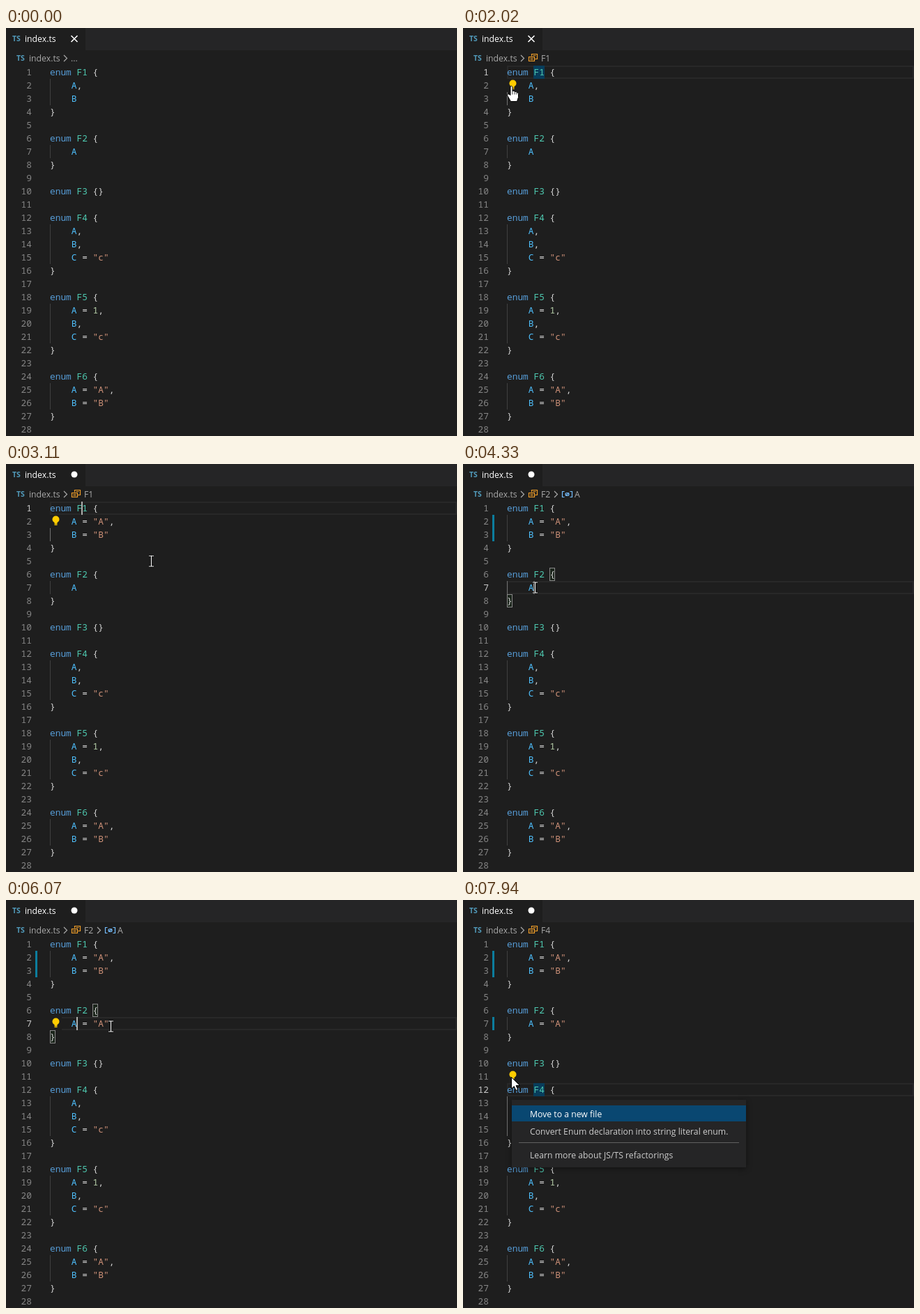
An HTML page with a canvas for the animation above (8 s loop, 647 by 586 pixels).

```html
<!DOCTYPE html>
<html lang="en">
<head>
<meta charset="utf-8">
<title>Enum refactoring</title>
<style>
html, body { margin: 0; width: 647px; height: 586px; overflow: hidden; background: #1e1e1e; }
canvas { display: block; }
</style>
</head>
<body>
<canvas id="stage" width="647" height="586"></canvas>
<script>
const ctx = document.getElementById('stage').getContext('2d', { alpha: false });
const LOOP = 8000, TICK = 155, DELAY = 460, MOVE = 310;
const LINE = 19, TOP = 54, LEFT = 63, CHAR = 7.7, ROW = 25;
const MONO = '500 12.83px "Noto Sans Mono", monospace';
const UI = '500 12.24px "Open Sans", sans-serif';
const BADGE = 'bold 10.5px "Open Sans", sans-serif';
const BG = '#1e1e1e';

const code = `enum F1 {
    A,
    B
}

enum F2 {
    A
}

enum F3 {}

enum F4 {
    A,
    B,
    C = "c"
}

enum F5 {
    A = 1,
    B,
    C = "c"
}

enum F6 {
    A = "A",
    B = "B"
}
`.split('\n');

const LEARN = 'Learn more about JS/TS refactorings';
const declarationItems = ['Move to a new file', 'Convert Enum declaration into string literal enum.'];
const memberItems = ['Convert Enum member into string literal enum.'];

// Each scene: click a word, open the bulb menu, apply the conversion.
const scenes = [
  { line: 1, column: 5, crumbs: ['F1'], click: 1240, menu: 2170, apply: 2950,
    items: declarationItems, menuX: 70, approach: [[190, 141]], stops: [[201, 113], [208, 139]] },
  { line: 7, column: 4, crumbs: ['F2', 'A'], click: 4020, menu: 5280, apply: 5750,
    items: memberItems, menuX: 66, approach: [], stops: [[150, 212]] },
  { line: 12, column: 5, crumbs: ['F4'], click: 7010, menu: 7940, apply: Infinity,
    items: declarationItems, menuX: 70, approach: [[150, 106]], stops: [] }
];

const lineTop = n => TOP + (n - 1) * LINE;
const columnX = c => LEFT + c * CHAR;
const indented = n => code[n - 1].startsWith(' ');
const within = (t, start, end) => t >= start && t < end;
const sceneAt = (t, delay = 0) => scenes.findLast(s => s.click + delay <= t);

for (const scene of scenes) {
  const { line } = scene;
  scene.block = [];
  for (let n = indented(line) ? line : line + 1; indented(n); n++) scene.block.push(n);
  // The bulb needs free space: an indent, or else a neighbouring line.
  scene.bulb = indented(line) ? line : line > 1 ? line - 1 : line + 1;
  scene.menuY = lineTop(Math.max(line, scene.bulb) + 1) + 5;
}

const path = [{ t: 100, x: 355, y: 9 }];
function travel(start, end, points) {
  path.push({ ...path.at(-1), t: start });
  points.forEach(([x, y], i) => path.push({ t: start + (end - start) * (i + 1) / points.length, x, y }));
}
scenes.forEach((s, i) => {
  const start = i ? scenes[i - 1].apply + 150 : 100;
  travel(start, s.click - 300, [...s.approach, [columnX(s.column + 1) + 1, lineTop(s.line) + 9]]);
  travel(s.menu - 450, s.menu - 250, [[69, lineTop(s.bulb) + 10]]);
  travel(s.menu, s.menu + MOVE * s.stops.length, s.stops);
});

function rect(x, y, w, h, color) {
  ctx.fillStyle = color;
  ctx.fillRect(x, y, w, h);
}

function text(str, x, y, color, font = UI) {
  ctx.font = font;
  ctx.fillStyle = color;
  ctx.fillText(str, x, y);
}

function disc(x, y, r, color) {
  ctx.fillStyle = color;
  ctx.beginPath();
  ctx.arc(x, y, r, 0, 7);
  ctx.fill();
}

function shape(d, x, y, color, width, fill) {
  const outline = new Path2D(d);
  ctx.save();
  ctx.translate(x, y);
  if (fill) {
    ctx.fillStyle = fill;
    ctx.fill(outline);
  }
  ctx.strokeStyle = color;
  ctx.lineWidth = width;
  ctx.stroke(outline);
  ctx.restore();
}

function tokenColor(token) {
  if (token === 'enum') return '#569cd6';
  if (/^F\d/.test(token)) return '#4ec9b0';
  if (/^[A-C]$/.test(token)) return '#4fc1ff';
  if (token[0] === '"') return '#ce9178';
  return /^\d/.test(token) ? '#b5cea8' : '#d4d4d4';
}

function drawHeader(t) {
  rect(114, 0, 533, 32, '#252526');
  text('TS', 9, 19, '#519aba', BADGE);
  text('index.ts', 27, 20, '#fff');
  if (t < scenes[0].apply) shape('M-4.5-4.5l9 9M4.5-4.5l-9 9', 98, 15.5, '#fff', 1.6);
  else disc(98, 15, 4.5, '#fff');

  const grey = '#a9a9a9';
  text('TS', 15, 47, '#519aba', BADGE);
  text('index.ts', 33, 48, grey);
  const chevron = x => shape('M0-4.5l4.5 4.5-4.5 4.5', x, 43.5, grey, 1.2);
  chevron(83);
  const [name, member] = sceneAt(t, TICK)?.crumbs ?? [];
  if (!name) return text('...', 93, 48, grey);
  shape('M4.5 3.5V.5h8v7h-4M.5 4.5h8v6h-8zM6.5 2.5h4M2.5 6.5h4M2.5 8.5h4', 94, 37, '#ee9d28', 1.2);
  text(name, 112, 48, grey);
  if (!member) return;
  chevron(131);
  shape('M3.5.5h-3v8h3M11.5.5h3v8h-3M5 4.5a2.5 2 0 1 0 5 0a2.5 2 0 1 0-5 0M5 6.5l5-4', 142, 39, '#75beff', 1.2);
  text(member, 160, 48, grey);
}

function drawBracket(line, column) {
  const x = Math.floor(columnX(column)), y = lineTop(line);
  rect(x, y, 8, LINE, '#888');
  rect(x + 1, y + 1, 6, LINE - 2, '#1b251b');
}

function drawMarks(t, { line, column, crumbs, click, apply }) {
  rect(LEFT, lineTop(line), 584, LINE, '#282828');
  rect(LEFT + 2, lineTop(line) + 2, 580, LINE - 4, BG);
  if (within(t, click + DELAY, apply))
    rect(Math.floor(columnX(column)), lineTop(line), Math.ceil(crumbs.at(-1).length * CHAR), LINE, '#083d5b');
}

function drawLine(t, n, scene) {
  const y = lineTop(n);
  const edit = scenes.find(s => s.apply <= t && s.block.includes(n));
  const str = edit ? code[n - 1].replace(/\w/, '$& = "$&"') : code[n - 1];
  text(n, 37 - String(n).length * CHAR, y + 14, n === scene?.line ? '#c6c6c6' : '#858585', MONO);
  if (indented(n)) rect(LEFT, y, 1, LINE, scene?.block.includes(n) ? '#707070' : '#404040');
  if (edit && t >= edit.apply + DELAY) rect(42, y, 3, LINE, '#0c7d9d');
  for (const m of str.matchAll(/"\w+"|\w+|[^\s\w]/g))
    text(m[0], columnX(m.index), y + 14, tokenColor(m[0]), MONO);
}

function drawBulb(line) {
  const y = lineTop(line);
  rect(LEFT, y, 17, LINE, BG);
  disc(71.5, y + 6.5, 5, '#fc0');
  rect(69.5, y + 9, 4, 4, '#fc0');
  rect(69.5, y + 13.5, 4, 1.5, '#fc0');
}

function drawEditor(t, scene) {
  if (scene) drawMarks(t, scene);
  const focus = sceneAt(t, TICK);
  if (focus && indented(focus.line)) {
    drawBracket(focus.line - 1, code[focus.line - 2].length - 1);
    drawBracket(focus.line + 1, 0);
  }
  code.forEach((_, i) => drawLine(t, i + 1, scene));
  if (!scene) return;
  const { line, column, click, apply, bulb } = scene;
  if (within(t, click, click + DELAY) || within(t, apply, apply + DELAY))
    rect(Math.round(columnX(column + 1)) - 1, lineTop(line), 2, LINE, '#aeafad');
  if (t >= click + DELAY) drawBulb(bulb);
}

function drawMenu({ menuX: x, menuY: y, items }, mouse) {
  const end = y + 8 + items.length * ROW;
  ctx.font = UI;
  const w = Math.round(Math.max(...items.map(item => ctx.measureText(item).width))) + 52;
  ctx.save();
  ctx.shadowColor = 'rgba(0,0,0,.4)';
  ctx.shadowBlur = 8;
  ctx.shadowOffsetY = 2;
  rect(x, y, w, end - y + 39, '#252526');
  ctx.restore();
  const selected = items.length > 1 && mouse.y > y + 8 + ROW ? 1 : 0;
  items.forEach((item, i) => {
    const top = y + 8 + i * ROW;
    if (i === selected) rect(x, top, w, 23, '#094771');
    text(item, x + 26, top + 17, i === selected ? '#fff' : '#ccc');
  });
  rect(x + 10, end + 3, w - 20, 1, '#606060');
  text(LEARN, x + 26, end + 26, '#ccc');
}

function mouseAt(t) {
  const time = Math.max(100, Math.floor(t / TICK) * TICK);
  const from = path.findLast(p => p.t <= time);
  const to = path.find(p => p.t > time) ?? from;
  const u = (time - from.t) / (to.t - from.t || 1), k = u * u * (3 - 2 * u);
  return { x: Math.round(from.x + (to.x - from.x) * k), y: Math.round(from.y + (to.y - from.y) * k) };
}

function pointerShape({ x, y }, menu, bulb) {
  if (menu) return x > menu.menuX && y > menu.menuY ? 'hand' : 'arrow';
  if (y < 32) return 'arrow';
  const overBulb = bulb && Math.abs(x - 71) < 9 && Math.abs(y - lineTop(bulb) - 9) < 10;
  return y < TOP || overBulb ? 'hand' : 'beam';
}

function drawMouse({ x, y }, pointer) {
  x += .5;
  y += .5;
  if (pointer === 'beam') {
    const beam = 'M-3.5-7.5h3l.5.5.5-.5h3M0-7V7M-3.5 7.5h3L0 7l.5.5h3';
    shape(beam, x, y, '#000', 3);
    shape(beam, x, y, '#fff', 1.2);
  } else if (pointer === 'arrow') {
    shape('M0 0V16.5L3.8 13 6.5 19 9.2 17.8 6.6 12H12Z', x, y, '#000', 1, '#fff');
  } else {
    shape('M-1.5 1Q0-1.5 1.5 1V7Q4 5.5 4.7 8 7 7 7.5 9 10 8.5 10 11V16L8 22H-1L-5.5 14Q-6.5 10.5-3.5 11.5L-1.5 13Z',
      x, y, '#000', 1, '#fff');
    shape('M1.5 7v5M4.7 8v4M7.5 9v3', x, y, '#000', .8);
  }
}

function drawPointer(t, scene) {
  const mouse = mouseAt(t);
  const menu = scenes.find(s => within(t, s.menu, s.apply));
  if (menu) drawMenu(menu, mouse);
  // The first word click leaves no ring.
  const pressed = scenes.some((s, i) =>
    i && within(t, s.click, s.click + 150) || within(t, s.apply - 150, s.apply));
  if (pressed) disc(mouse.x - 1, mouse.y, 12, 'rgba(230,220,10,.57)');
  drawMouse(mouse, pointerShape(mouse, menu, scene && t >= scene.click + DELAY && scene.bulb));
}

function draw() {
  const t = performance.now() % LOOP;
  const scene = sceneAt(t);
  rect(0, 0, 647, 586, BG);
  drawHeader(t);
  drawEditor(t, scene);
  if (t >= 100) drawPointer(t, scene);
  requestAnimationFrame(draw);
}
draw();
</script>
</body>
</html>
```
